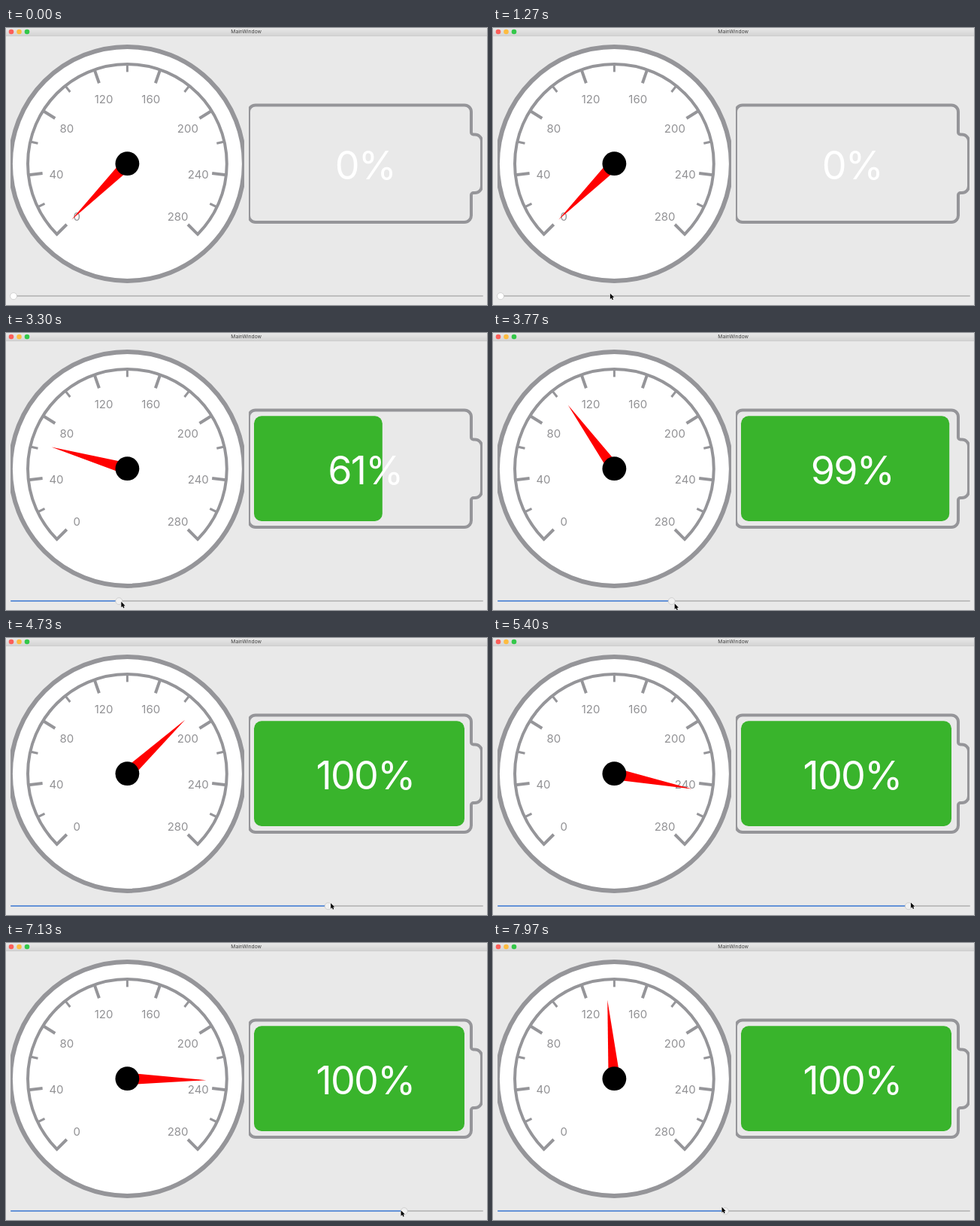
An HTML page for the animation above (8 s loop, 640x368 px).

```html
<!DOCTYPE html>
<html lang="en">
<head>
<meta charset="utf-8">
<title>MainWindow</title>
<style>
  html, body { margin: 0; width: 100%; height: 100%; overflow: hidden; background: #e9e9e9; }
  svg { display: block; width: 100vw; height: 100vh; }
  text { font-family: Inter, Roboto, sans-serif; text-anchor: middle; }
  .line { fill: none; stroke: #959599; }
  .label { font-size: 15px; fill: #929295; }
  .percent { font-size: 52px; letter-spacing: -1.7px; fill: #fff; }
</style>
</head>
<body>
<svg viewBox="0 0 640 368">
  <defs>
    <linearGradient id="bar" x2="0" y2="1">
      <stop stop-color="#e8e8e8"/>
      <stop offset="1" stop-color="#d4d4d4"/>
    </linearGradient>
    <clipPath id="dialBox"><rect x="6" y="16" width="311" height="330"/></clipPath>
    <clipPath id="batteryBox"><rect x="323" y="16" width="311" height="330"/></clipPath>
  </defs>
  <rect width="640" height="368" fill="#e9e9e9"/>

  <rect width="640" height="10" fill="url(#bar)"/>
  <rect y="10" width="640" height=".7" fill="#c2c2c2"/>
  <circle cx="7" cy="5" r="3.3" fill="#fc5f5a"/>
  <circle cx="17.5" cy="5" r="3.3" fill="#fdbc40"/>
  <circle cx="28" cy="5" r="3.3" fill="#34c84a"/>
  <text x="319.7" y="7.4" font-size="6.7" fill="#404040">MainWindow</text>

  <g clip-path="url(#dialBox)">
    <circle class="line" cx="161.4" cy="180.4" r="155.5" stroke-width="6" style="fill:#fff"/>
    <g id="scale"></g>
    <path id="needle" d="M-7.8 0L0 -105L7.8 0z" fill="#f00"/>
    <circle cx="161.4" cy="180.2" r="15.9"/>
  </g>

  <g clip-path="url(#batteryBox)">
    <path class="line" stroke-width="4" d="M332 102.4H610a9 9 0 0 1 9 9V138.500a3 3 0 0 0 3 3H624a9 9 0 0 1 9 9V210a9 9 0 0 1 -9 9H622a3 3 0 0 0 -3 3V249a9 9 0 0 1 -9 9H332a9 9 0 0 1 -9 -9V111.400a9 9 0 0 1 9 -9z"/>
    <rect id="charge" x="330" y="110.300" height="139.700" rx="10" fill="#39b42c"/>
    <text id="percent" class="percent" x="478" y="201.300"></text>
  </g>

  <rect x="6" y="355.200" width="629" height="1.600" rx=".8" fill="#b1b1b1"/>
  <rect id="filled" x="6" y="355.200" height="1.600" rx=".8" fill="#4584e0"/>
  <circle id="knob" cy="356.200" r="4.500" stroke="#bdbdbd" stroke-width=".6"/>
  <path id="cursor" d="M0 0V7.500L1.700 5.900L2.900 8.500L4.200 7.900L3.100 5.400H5.300z" stroke="#fff" stroke-width=".7" paint-order="stroke"/>
</svg>
<script>
const LOOP = 8000, CX = 161.4, CY = 180.4, SWEEP = 270, PRESS = 1850;
const $ = id => document.getElementById(id);
const polar = (deg, r) => {
  const a = deg * Math.PI / 180;
  return [CX + r * Math.cos(a), CY - r * Math.sin(a)];
};
const point = (deg, r) => polar(deg, r).map(n => n.toFixed(2)).join(' ');

function buildScale() {
  const R = 132.4, steps = 14;
  let html = `<path class="line" stroke-width="4" d="M${point(225, 114)}L${point(225, R)}` +
    `A${R} ${R} 0 1 1 ${point(-45, R)}L${point(-45, 114)}"/>`;
  for (let i = 0; i <= steps; i++) {
    const deg = 225 - i * SWEEP / steps, major = i % 2 === 0;
    if (i % steps) {
      html += `<path class="line" stroke-width="${major ? 4 : 3}" d="M${point(deg, R)}L${point(deg, major ? 113.5 : 122)}"/>`;
    }
    if (major) {
      const [x, y] = polar(deg, 95);
      html += `<text class="label" x="${x}" y="${y + 8.9}">${i * 20}</text>`;
    }
  }
  $('scale').innerHTML = html;
}

// the drag as [time, value]: slow start, steady sweep to the end, pause, way back
const DRAG = [[PRESS, 0], [2300, 9], [3300, 61], [3770, 99], [4730, 182], [6150, 270], [6450, 270], [7970, 130], [8300, 100]];

// monotone cubic through the keys
function value(t) {
  if (t <= PRESS) return 0;
  const i = DRAG.findIndex(k => k[0] > t) - 1;
  const slope = j => j < 0 || j > DRAG.length - 2 ? 0
    : (DRAG[j + 1][1] - DRAG[j][1]) / (DRAG[j + 1][0] - DRAG[j][0]);
  const tangent = j => {
    const a = slope(j - 1), b = slope(j);
    return a * b > 0 ? 2 * a * b / (a + b) : 0;
  };
  const [t0, v0] = DRAG[i], [t1, v1] = DRAG[i + 1];
  const h = t1 - t0, u = (t - t0) / h, w = 1 - u;
  return v0 * (1 + 2 * u) * w * w + v1 * u * u * (3 - 2 * u) +
    h * u * w * (tangent(i) * w - tangent(i + 1) * u);
}

const knobX = v => 10 + v * 2.3;

// the pointer swoops in from the top, then leads the handle by its speed and sways a little
function pointer(t) {
  if (t < PRESS) {
    const p = Math.min(t / 1660, 1);
    return [452 - 442 * p ** 1.5, 355 - 375 * (1 - p) ** 3.5];
  }
  const v = value(t), speed = (value(t + 20) - value(t - 20)) / 40;
  const sway = 4.5 * Math.min(v / 40, 1) * Math.cos((t - 3770) / 2700 * 2 * Math.PI);
  return [knobX(v) + speed * 45, 355 + sway];
}

function render(t) {
  const v = Math.round(value(t)), level = Math.min(v, 100), x = knobX(v);
  $('needle').setAttribute('transform', `translate(${CX} ${CY}) rotate(${v - 135})`);
  $('charge').setAttribute('width', level * 2.8);
  $('percent').textContent = level + '%';
  $('filled').setAttribute('width', v ? x - 6 : 0);
  $('knob').setAttribute('cx', x);
  $('knob').setAttribute('fill', t >= PRESS ? '#f0f0f0' : '#fff');
  $('cursor').setAttribute('transform', `translate(${pointer(t).map(n => n.toFixed(2)).join(' ')})`);
}

buildScale();
const start = performance.now();
function tick() {
  render((performance.now() - start) % LOOP);
  requestAnimationFrame(tick);
}
tick();
</script>
</body>
</html>
```
